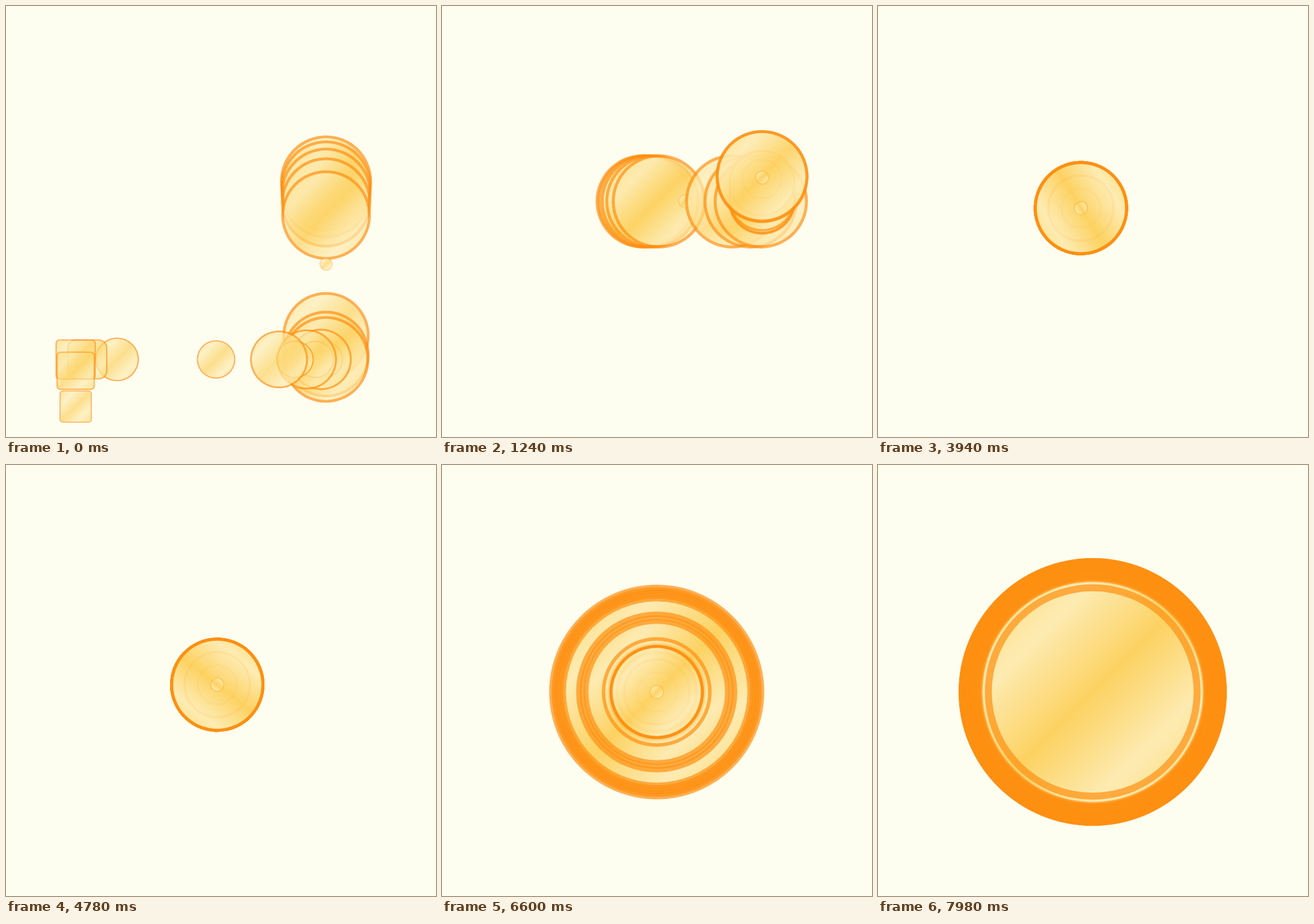
These frames come from a looping animation (747 by 750 pixels, 8 s). An HTML page with a canvas:

```html
<!DOCTYPE html>
<html lang="en">
<head>
<meta charset="utf-8">
<title>Trail</title>
<style>
  html, body { margin: 0; width: 100%; height: 100%; overflow: hidden; background: #fdfdf0; }
  canvas { display: block; }
</style>
</head>
<body>
<canvas id="stage" width="747" height="750"></canvas>
<script>
const ctx = document.getElementById('stage').getContext('2d');
const LOOP = 8000;
const COUNT = 21;
const UNIT = 11.7;
const FULL = 233;
const OPACITY = 0.7;
const BORDER = 0.065;

// Corners of the route: [local time, x, y]
const route = [
  [20, 121, 697], [120, 121, 615], [720, 556, 615], [1330, 556, 296],
  [1930, 556, 340], [2510, 347, 340]
];
const xs = route.map(([t, x]) => [t, x]);
const ys = route.map(([t, , y]) => [t, y]);

// Even spacing, with a wider step on both sides of every tenth disc
function headStart(i) {
  const breaks = Math.floor((i + 5) / 10) + Math.floor((i + 4) / 10);
  return 1200 - 46 * i - 65 * breaks;
}

// Large discs at both ends, medium and small ones in turn between, a dot every fifteenth
function restRadius(i) {
  if (i % 15 === 5) return UNIT;
  if (Math.abs(i - 13) > 4) return 7 * UNIT;
  return (i % 2 ? 3 : 5) * UNIT;
}

const clamp = v => Math.min(1, Math.max(0, v));
const mix = (a, b, p) => a + (b - a) * p;
const smooth = p => p * p * (3 - 2 * p);

// cubic-bezier(.25, .1, .25, 1)
function ease(x) {
  if (x <= 0 || x >= 1) return clamp(x);
  let lo = 0, hi = 1;
  for (let i = 0; i < 18; i++) {
    const u = (lo + hi) / 2, v = 1 - u;
    if (0.75 * v * v * u + 0.75 * v * u * u + u * u * u < x) lo = u; else hi = u;
  }
  const v = 1 - lo;
  return 0.3 * v * v * lo + 3 * v * lo * lo + lo * lo * lo;
}

const progress = (t, from, to) => ease(clamp((t - from) / (to - from)));

// Value at time t from steps of [time, value]
function along(steps, t) {
  let value = steps[0][1];
  for (let i = 1; i < steps.length; i++)
    value = mix(value, steps[i][1], progress(t, steps[i - 1][0], steps[i][0]));
  return value;
}

const sheen = ctx.createLinearGradient(-1, -1, 1, 1);
['#fdd970', '#fdebb2', '#fcd262', '#fdebb2', '#fdd970']
  .forEach((color, i) => sheen.addColorStop(i / 4, color));

function box(half, corner) {
  ctx.roundRect(-half, -half, 2 * half, 2 * half, Math.max(0, corner));
}

function drawDisc(x, y, r, corner, angle) {
  const inner = 1 - BORDER;
  ctx.save();
  ctx.translate(x, y);
  ctx.rotate(angle);
  ctx.scale(r, r);
  ctx.globalAlpha = OPACITY;
  ctx.fillStyle = '#ff9012';
  ctx.beginPath();
  box(1, corner);
  box(inner, corner - BORDER);
  ctx.fill('evenodd');
  ctx.fillStyle = sheen;
  ctx.beginPath();
  box(inner, corner - BORDER);
  ctx.fill();
  ctx.restore();
}

function draw(t) {
  ctx.fillStyle = '#fdfdf0';
  ctx.fillRect(0, 0, 747, 750);
  const drift = smooth(clamp((t - 3300) / 2150));
  for (let i = 0; i < COUNT; i++) {
    const local = t + headStart(i);
    const rest = restRadius(i);
    const settled = along([[20, 28], [120, 35], [720, 0.92 * rest], [1930, rest]], local);
    const r = mix(settled, FULL, progress(local, 6820, 9220));
    const corner = Math.min(1, 0.2 + 5 * progress(local, 120, 720));
    drawDisc(along(xs, local) + 26 * drift, along(ys, local) + 55 * drift,
      r, corner, -2 * Math.PI * drift);
  }
}

// The picture holds for 20, 100 and 20 ms in turn.
function held(t) {
  const part = t % 140;
  return t - part + (part < 20 ? 0 : part < 120 ? 20 : 120);
}

const began = performance.now();
function tick() {
  draw(held((performance.now() - began) % LOOP));
  requestAnimationFrame(tick);
}
tick();
</script>
</body>
</html>
```
